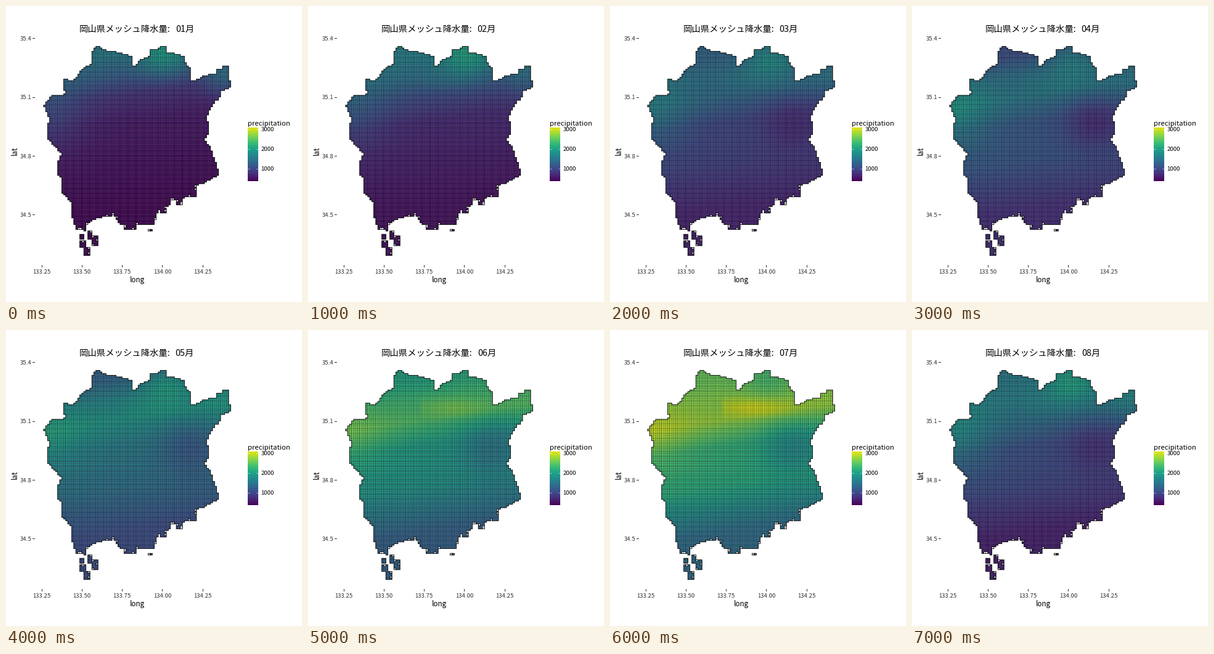
Write a matplotlib script that moves like this. It is 480x480 px and loops after 8 s.

```python
import numpy as np
import matplotlib.pyplot as plt
from matplotlib.animation import FuncAnimation
from matplotlib.collections import LineCollection, PolyCollection
from matplotlib.path import Path

SIZE, DPI = 480, 72
CELL_W, CELL_H = 3.26, 2.65   # one mesh cell: 1/80 deg by 1/120 deg
X0, Y0 = 123.0, 147.6         # 133.50 E, 35.10 N
GREY = "#333333"
plt.rcParams["font.family"] = "Noto Sans CJK JP"

# Key points of the coast and border, clockwise; the mesh makes the steps
BORDER = [
    (145, 66), (153, 66), (155, 71), (181, 75), (203, 81), (205, 97),
    (212, 97), (217, 88), (234, 82), (234, 71), (249, 69), (249, 65),
    (260, 65), (260, 76), (273, 77), (290, 82), (290, 90), (299, 103),
    (298, 122), (309, 120), (324, 112), (341, 111), (343, 103), (350, 103),
    (350, 97), (361, 97), (360, 119), (364, 122), (364, 132), (349, 138),
    (345, 152), (338, 154), (326, 178), (328, 205), (322, 218), (331, 228),
    (344, 267), (344, 275), (320, 287), (309, 290), (309, 309), (283, 311),
    (266, 316), (266, 322), (247, 330), (240, 354), (186, 354), (175, 339),
    (146, 344), (131, 354), (130, 364), (114, 361), (107, 341), (106, 318),
    (91, 302), (92, 278), (83, 275), (83, 257), (90, 240), (67, 213),
    (70, 182), (62, 162), (74, 146), (97, 143), (94, 131), (94, 119),
    (110, 121), (123, 104), (139, 93), (139, 82), (142, 70)]

# Islands as x0, y0, x1, y1
ISLANDS = [(276, 313, 286, 322), (250, 327, 260, 336), (231, 361, 238, 365),
           (190, 353, 210, 363), (119, 370, 127, 378), (132, 366, 140, 379),
           (138, 374, 149, 388), (119, 382, 130, 391), (126, 391, 136, 404)]

# Rain from north to south at BANDS, then the strength of the local effects:
# northern peak, west, north-east, dry basin, ridge
BANDS = [70, 105, 138, 180, 245, 320]
CLIMATE = {
    1: ([.42, .30, .15, .07, .04, .015], [.18, .10, .18, 0, 0]),
    2: ([.45, .38, .24, .12, .08, .04], [.17, .08, .10, 0, .04]),
    4: ([.24, .38, .42, .28, .27, .14], [.12, .14, 0, -.15, .03]),
    5: ([.32, .47, .54, .43, .38, .24], [.15, .08, .04, -.13, .03]),
    7: ([.77, .82, .85, .66, .63, .36], [-.08, .08, 0, -.16, .12]),
    8: ([.42, .45, .38, .25, .22, .09], [.16, .14, .08, -.10, .03]),
}


def bump(x, y, cx, cy, rx, ry):
    return np.exp(-((x - cx) / rx) ** 2 - ((y - cy) / ry) ** 2)


def rain(month, x, y):
    """Share of the colour scale at each place."""
    if month not in CLIMATE:
        return 0.4 * rain(month - 1, x, y) + 0.6 * rain(month + 1, x, y)
    profile, strengths = CLIMATE[month]
    effects = [bump(x, y, 257, 84, 40, 32), bump(x, y, 70, 180, 60, 60),
               bump(x, y, 355, 115, 35, 30), bump(x, y, 298, 190, 50, 45),
               bump(x, y, 238, 125, 65, 15) * (x > 183)]
    # the bands run slightly up towards the east
    field = np.interp(y + 0.15 * (x - 235), BANDS, profile)
    return field + sum(s * e for s, e in zip(strengths, effects))


def build_mesh():
    """Column and row edges, and a grid: 0 sea, 1 land, 2 land without data."""
    cols = X0 + CELL_W * np.arange(-22, 77)
    rows = Y0 + CELL_H * np.arange(-34, 100)
    x, y = np.meshgrid(cols[:-1] + CELL_W / 2, rows[:-1] + CELL_H / 2)
    centres = np.column_stack([x.ravel(), y.ravel()])
    land = Path(BORDER).contains_points(centres).reshape(x.shape)
    for x0, y0, x1, y1 in ISLANDS:
        land |= (x > x0) & (x < x1) & (y > y0) & (y < y1)
    sides = [np.roll(land, step, axis) for step in (-1, 1) for axis in (0, 1)]
    coast = land & ~np.all(sides, axis=0)
    rng = np.random.default_rng(4)
    empty = coast & (y > 288) & (x > 110) & (rng.random(x.shape) < 0.12)
    return cols, rows, x, y, land.astype(int) + empty


def edge_lines(cols, rows, grid):
    """Cell edges between different kinds of cells."""
    down = [[(cols[c + 1], rows[r]), (cols[c + 1], rows[r + 1])]
            for r, c in np.argwhere(np.diff(grid, axis=1))]
    across = [[(cols[c], rows[r + 1]), (cols[c + 1], rows[r + 1])]
              for r, c in np.argwhere(np.diff(grid, axis=0))]
    return down + across


def label(x, y, text, size, color="black", **kw):
    return ax.text(x, y, text, fontsize=size, color=color, va="baseline", **kw)


fig = plt.figure(figsize=(SIZE / DPI, SIZE / DPI), dpi=DPI, facecolor="white")
ax = fig.add_axes([0, 0, 1, 1])
ax.axis("off")

# Map
cols, rows, grid_x, grid_y, grid = build_mesh()
land = grid > 0
cell_x, cell_y, empty = grid_x[land], grid_y[land], grid[land] == 2
corners = np.array([(-1, -1), (1, -1), (1, 1), (-1, 1)]) * (CELL_W / 2, CELL_H / 2)
mesh = PolyCollection(np.column_stack([cell_x, cell_y])[:, None] + corners,
                      edgecolors="black", linewidths=0.25, snap=False)
ax.add_collection(mesh)
ax.add_collection(LineCollection(edge_lines(cols, rows, grid), colors="black",
                                 linewidths=0.8, capstyle="projecting", snap=False))

# Axes
for i in range(4):
    y = 52.2 + 95.4 * i
    ax.plot([43.2, 46], [y, y], color=GREY, lw=1)
    label(41.5, y + 3.6, f"{35.4 - 0.3 * i:.1f}", 9.6, GREY, ha="right")
for i in range(5):
    x = 57.8 + 65.2 * i
    ax.plot([x, x], [420, 422.8], color=GREY, lw=1)
    label(x, 434, f"{133.25 + 0.25 * i:.2f}", 9.6, GREY, ha="center")
label(212.5, 448, "long", 11.6, ha="center")
label(17.5, 235, "lat", 11.6, ha="center", rotation=90, rotation_mode="anchor")

# Legend
label(392, 193.7, "precipitation", 11.4)
ax.imshow(np.linspace(0, 0.96, 256)[:, None], cmap="viridis", vmin=0, vmax=1,
          origin="lower", extent=(392, 409, 284.5, 198), aspect="auto")
for i in range(3):
    y = 264 - 32 * i
    for x in (392, 405.6):
        ax.plot([x, x + 3.4], [y, y], color="white", lw=0.5)
    label(413.5, y + 3.2, str(1000 * (i + 1)), 9.6)

# Title
label(119, 42, "岡山県メッシュ降水量:", 14.4)
month_text = label(305, 42, "", 14.4, ha="right")

ax.set_xlim(0, SIZE)
ax.set_ylim(SIZE, 0)


def update(frame):
    month = frame + 1
    colors = plt.cm.viridis(np.clip(rain(month, cell_x, cell_y), 0, 1))
    colors[empty] = 1
    mesh.set_facecolor(colors)
    month_text.set_text(f"{month:02d}月")
    return mesh, month_text


anim = FuncAnimation(fig, update, frames=8, interval=1000, repeat=True, repeat_delay=0)
plt.show()
```
